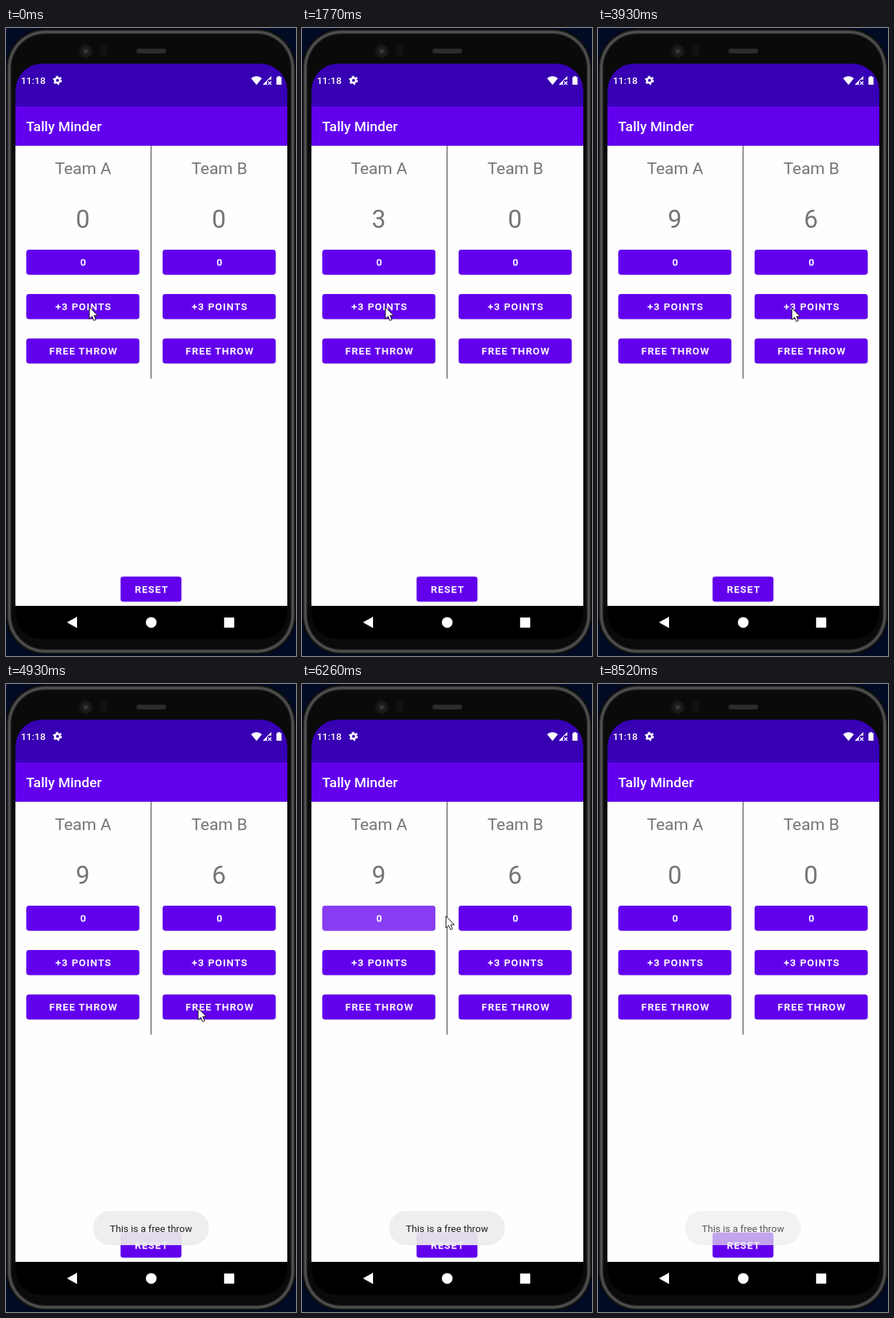
An HTML page that plays this animation: 400 by 864 pixels, repeating every 8620 ms.

```html
<!DOCTYPE html>
<html lang="en">
<head>
<meta charset="utf-8">
<title>Tally Minder</title>
<style>
html, body { margin: 0; width: 100%; height: 100%; overflow: hidden; background: #020b24; }
svg { display: block; width: 100%; height: 100%; }
text { font-family: Roboto, sans-serif; }
.team { font-size: 22.9px; fill: #757575; text-anchor: middle; }
.score { font-size: 34.4px; fill: #757575; text-anchor: middle; }
.label {
  font-size: 13.6px; font-weight: 500; letter-spacing: 1.22px; text-anchor: middle;
  fill: #fff; stroke: #fff; stroke-width: .25px;
}
</style>
</head>
<body>
<svg viewBox="0 0 400 864">
  <defs>
    <radialGradient id="lens">
      <stop offset="0" stop-color="#4a4a4a"/>
      <stop offset=".4" stop-color="#202020"/>
      <stop offset="1" stop-color="#111"/>
    </radialGradient>
    <clipPath id="screen"><rect x="13" y="49" width="375" height="792" rx="37"/></clipPath>
  </defs>

  <rect width="400" height="864" fill="#020b24"/>
  <g id="body"></g>
  <circle cx="110" cy="32" r="9.5" fill="url(#lens)"/>
  <rect x="130" y="23" width="9" height="18" rx="4" fill="#111"/>
  <rect x="180" y="28.5" width="41" height="6.5" rx="3" fill="#2c2c2c"/>

  <g clip-path="url(#screen)">
    <rect x="13" y="49" width="375" height="792" fill="#000"/>
    <rect x="13" y="49" width="375" height="60" fill="#3700b3"/>
    <rect x="13" y="108" width="375" height="54" fill="#6200ee"/>
    <rect x="13" y="162" width="375" height="633" fill="#fefefe"/>
    <rect x="199.5" y="162" width="1.2" height="320.5" fill="#4a4a4a"/>
  </g>

  <g fill="#fff">
    <text x="20.5" y="77.2" font-size="13.4" font-weight="500">11:18</text>
    <circle cx="71" cy="72" r="3.4" fill="none" stroke="#fff" stroke-width="2.7"/>
    <circle cx="71" cy="72" r="5.2" fill="none" stroke="#fff" stroke-width="2" stroke-dasharray="2.7 2.745"/>
    <path d="M338 69.3Q345.5 63 353 69.3L345.5 78.3Z"/>
    <path d="M366 66V71H362.5L360 73.5V78H354Z"/>
    <path d="M361.5 73.5L366 78M366 73.5L361.5 78" stroke="#fff" stroke-width="1.3"/>
    <path d="M374.8 66.2H378.2V67.5H380V78H373V67.5H374.8Z"/>
    <text x="27.8" y="142.3" font-size="19.1" font-weight="500">Tally Minder</text>
    <path d="M84 817.8L98 810V825.6Z"/>
    <circle cx="200.3" cy="817.8" r="7.4"/>
    <rect x="300.8" y="811" width="14" height="14" rx="1"/>
  </g>

  <text class="team" x="106.3" y="201">Team A</text>
  <text class="team" x="294.3" y="201">Team B</text>
  <text class="score" id="scoreA" x="106" y="274.5">0</text>
  <text class="score" id="scoreB" x="293.7" y="274.5">0</text>
  <g id="buttons"></g>

  <g id="toast">
    <rect x="120" y="725" width="160" height="47" rx="23.5" fill="#ededed" fill-opacity=".92"/>
    <text x="200" y="753.6" font-size="13.4" fill="#222" text-anchor="middle">This is a free throw</text>
  </g>
  <path id="cursor" d="M0 0V16.2L3.7 12.7L6.3 18.6L9 17.4L6.5 11.7H11.4Z" fill="#fff" stroke="#111" stroke-linejoin="round"/>
</svg>

<script>
const LOOP = 8620;
const CLICK_DELAY = 150;
const POINTER_GONE = 8000;
const HOME = { x: 115, y: 384 };

const moves = [
  { at: 1900, time: 240, x: 165, y: 384 },
  { at: 2690, time: 250, x: 268, y: 385 },
  { at: 3930, time: 380, x: 120, y: 437 },
  { at: 4690, time: 240, x: 265, y: 446 },
  { at: 5660, time: 360, x: 130, y: 319 },
  { at: 6150, time: 380, x: 285, y: 320 },
  { at: 6550, time: 250, x: 175, y: 773 },
  { at: 7800, time: 110, x: 195, y: 786 }
];
const presses = {
  threeA: [1330, 2240, 2490], threeB: [3120, 3480],
  freeA: [4390], freeB: [5360],
  zeroA: [6060], zeroB: [6430], reset: [7480]
};

const $ = id => document.getElementById(id);
const clamp = v => Math.max(0, Math.min(1, v));
const ramp = (t, from, to) => clamp((t - from) / (to - from));
const easeOut = k => Math.sin(k * Math.PI / 2);
const clicks = (name, t) => presses[name].filter(p => t >= p + CLICK_DELAY).length;

function pointerAt(t) {
  return moves.reduce((p, m) => {
    const k = easeOut(ramp(t, m.at, m.at + m.time));
    return { x: p.x + (m.x - p.x) * k, y: p.y + (m.y - p.y) * k };
  }, HOME);
}

function make(tag, attrs, parent) {
  const el = document.createElementNS("http://www.w3.org/2000/svg", tag);
  for (const key in attrs) el.setAttribute(key, attrs[key]);
  return parent.appendChild(el);
}

// Nested outlines shade the metal rim from dark to grey and back to black.
const RIM = 8;
for (let i = 0; i <= RIM; i++) {
  const grey = 10 + 75 * Math.sin(Math.PI * i / RIM) ** 2;
  make("rect", {
    x: i, y: i + 1, width: 400 - 2 * i, height: 861 - 2 * i, rx: 54 - i,
    fill: `rgb(${grey},${grey},${grey})`
  }, $("body"));
}

function makeButton(name, label, x, y, width) {
  const box = { x, y, width, height: 34.4, rx: 3.8 };
  const group = make("g", {}, $("buttons"));
  make("rect", box, make("clipPath", { id: "clip-" + name }, group));
  const face = make("rect", { ...box, fill: "#6200ee" }, group);
  const ripples = make("g", { "clip-path": `url(#clip-${name})`, fill: "#fff" }, group);
  const circles = presses[name].map(start => {
    const { x: cx, y: cy } = pointerAt(start);
    return make("circle", { cx, cy }, ripples);
  });
  make("text", { class: "label", x: x + width / 2 + 1, y: y + 22.2 }, group).textContent = label;
  return { name, face, circles, width };
}

const rows = { zero: "0", three: "+3 POINTS", free: "FREE THROW" };
const buttons = ["A", "B"].flatMap((team, col) =>
  Object.entries(rows).map(([kind, label], row) =>
    makeButton(kind + team, label, 28 + 188 * col, 305 + 61.1 * row, 156)));
buttons.push(makeButton("reset", "RESET", 158, 754.8, 84));

function drawButton({ name, face, circles, width }, t) {
  let lift = 0;
  presses[name].forEach((start, i) => {
    const age = t - start;
    const live = age >= 0 && age < 420;
    circles[i].setAttribute("r", live ? width * (0.25 + 0.85 * ramp(age, 0, 190)) : 0);
    circles[i].setAttribute("opacity", live ? 0.24 * ramp(age, 420, 260) : 0);
    lift = Math.max(lift, clamp(1 - Math.abs(age - 100) / 100));
  });
  face.style.filter =
    `drop-shadow(0 ${0.9 + 1.5 * lift}px ${0.7 + lift}px rgba(0,0,0,.25))`;
}

function draw(t) {
  const cleared = clicks("reset", t) > 0;
  for (const team of "AB") {
    $("score" + team).textContent = cleared ? 0 : 3 * clicks("three" + team, t);
  }
  buttons.forEach(b => drawButton(b, t));
  $("toast").setAttribute("opacity", ramp(t, 4600, 4850) * (1 - 0.25 * ramp(t, 8300, 8520)));
  const { x, y } = pointerAt(t);
  $("cursor").setAttribute("transform", `translate(${x} ${y})`);
  $("cursor").setAttribute("visibility", t < POINTER_GONE ? "visible" : "hidden");
}

const begin = performance.now();
function frame() {
  draw((performance.now() - begin) % LOOP);
  requestAnimationFrame(frame);
}
frame();
</script>
</body>
</html>
```
